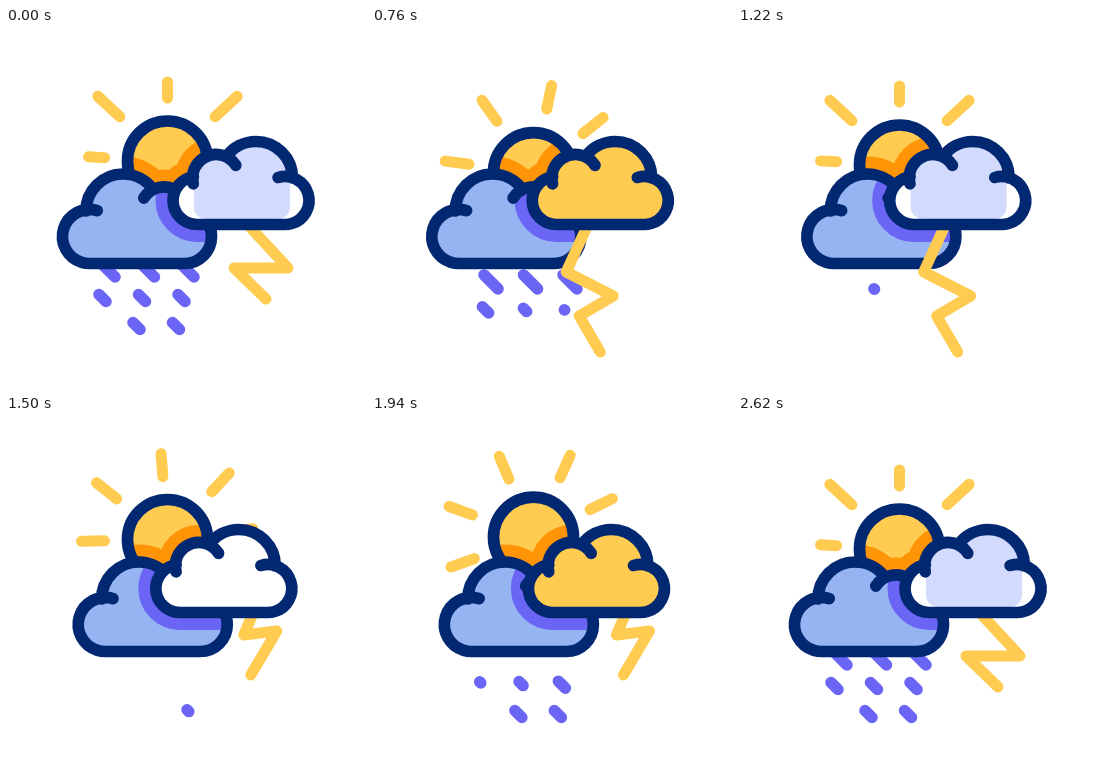
Write an HTML page with a canvas that moves like this. It is 360 px wide and 360 px high and loops after 3 s.

```html
<!DOCTYPE html>
<html lang="en">
<head>
<meta charset="utf-8">
<title>Weather</title>
<style>
html, body { margin: 0; width: 100%; height: 100%; overflow: hidden; background: #fff; }
canvas { display: block; width: 360px; height: 360px; }
</style>
</head>
<body>
<canvas id="stage" width="360" height="360"></canvas>
<script>
const ctx = document.getElementById('stage').getContext('2d');
const LOOP = 3000, TAU = 2 * Math.PI;
const NAVY = '#032872', BLUE = '#96b3f2', PURPLE = '#6a65f4';
const GOLD = '#ffcb51', ORANGE = '#ff9407', LAVENDER = '#d2dbfd';
const OUTLINE = 11.7, SHADOW = 17.5;

const clamp = v => Math.max(0, Math.min(1, v));
const mix = (a, b, u) => a + (b - a) * u;
const ease = (a, b, t) => (1 - Math.cos(Math.PI * clamp((t - a) / (b - a)))) / 2;
const hump = (a, b, t) => Math.sin(Math.PI * clamp((t - a) / (b - a)));

const rainCloudX = t => 16 * (ease(400, 1600, t) - ease(1900, 2580, t));
const stormCloudX = t => -17.2 * (ease(200, 1500, t) - ease(1600, 2400, t));
const sunY = t => 13 * ease(220, 900, t) - 27 * ease(900, 1720, t) + 14 * ease(1720, 2600, t);
const sunTurn = t => -36 * hump(220, 1220, t) ** 2 - 23 * hump(1320, 2600, t) ** 2;
const raySwell = t => hump(220, 1220, t) + hump(1240, 2300, t);

// Lobes are [x, y, radius]; the big one is on the left.
function makeCloud(foot, big, small, foot2) {
  const body = new Path2D(), outline = new Path2D();
  for (const [x, y, r] of [foot, big, small, foot2]) {
    body.moveTo(x + r, y);
    body.arc(x, y, r, 0, TAU);
  }
  body.rect(foot[0], big[1], foot2[0] - foot[0], foot[1] + foot[2] - big[1]);
  const arc = ([x, y, r], from, to, back, join) => {
    if (!join) outline.moveTo(x + r * Math.cos(from), y + r * Math.sin(from));
    outline.arc(x, y, r, from, to, back);
  };
  arc(foot, -1.28, Math.PI / 2, true);
  arc(foot2, Math.PI / 2, -1.42, true, true);
  arc(big, Math.PI, TAU - .62);
  arc(small, -2.57, .25);
  return { body, outline };
}

const rainCloud = makeCloud([83.5, 208.5, 27], [117, 183, 37], [158, 183, 24], [178.5, 208.5, 27]);
// Mirrored when drawn.
const stormCloud = makeCloud([-279, 172.5, 24], [-250, 150, 36.5], [-210, 150, 23.5], [-191, 172.5, 24]);

const REST_BOLT = [[243, 198], [282, 240], [228, 240], [260, 271]];
const LONG_BOLT = [[222, 198], [201, 244], [248, 268], [214, 288], [235, 324]];
const SHORT_BOLT = [[264, 198], [255, 219], [288, 215], [262, 259]];

function line(points, color, width) {
  ctx.beginPath();
  points.forEach(([x, y]) => ctx.lineTo(x, y));
  ctx.strokeStyle = color;
  ctx.lineWidth = width;
  ctx.stroke();
}

function drawOutline(path) {
  ctx.strokeStyle = NAVY;
  ctx.lineWidth = OUTLINE;
  ctx.stroke(path);
}

// The shadow is the cloud's body, grown on all sides.
function drawShadow(cloud, x, mirror, color) {
  ctx.save();
  ctx.translate(x, 0);
  ctx.scale(mirror, 1);
  ctx.fillStyle = ctx.strokeStyle = color;
  ctx.lineWidth = 2 * SHADOW;
  ctx.fill(cloud.body);
  ctx.stroke(cloud.body);
  ctx.restore();
}

function drawRays(t, x, y) {
  const swell = raySwell(t);
  for (let i = 3; i <= 8; i++) {
    const odd = i % 2, base = i * TAU / 8;
    const lean = (odd ? 3 : -3) * Math.cos(base);
    const angle = base + (lean + sunTurn(t)) * TAU / 360;
    const inner = odd ? 65 : 63, outer = mix(odd ? 95 : 79, 89, swell);
    const point = r => [x + r * Math.cos(angle), y + r * Math.sin(angle)];
    line([point(inner), point(outer)], GOLD, 11);
  }
}

function drawSun(t, rainX, stormX) {
  const x = 161.5, y = 133 + sunY(t);
  drawRays(t, x, y);
  const disc = new Path2D();
  disc.arc(x, y, 40, 0, TAU);
  ctx.fillStyle = GOLD;
  ctx.fill(disc);
  ctx.save();
  ctx.clip(disc);
  drawShadow(rainCloud, rainX, 1, ORANGE);
  drawShadow(stormCloud, stormX, -1, ORANGE);
  ctx.restore();
  drawOutline(disc);
}

// Drops vanish and return from the bottom row up, each row from right to left.
function drawRain(t, rainX) {
  for (let row = 0; row < 3; row++) {
    for (let col = row === 2 ? 1 : 0; col < 3; col++) {
      const end = 1060 - 290 * row + 85 * (2 - col), start = end + 970;
      if (t >= end && t < start) continue;
      const falling = t < end;
      const half = (row ? 3.5 : 7) * clamp((falling ? end - t : t - start) / 200);
      const shift = falling ? 19 * ease(220, 1150, t) : -4 * (1 - clamp((t - start) / 300));
      const x = 102 - 5.5 * row + 39.5 * col + rainX + 1.15 * shift;
      const y = 242 + 28 * row + shift;
      line([[x - half, y - half], [x + half + .01, y + half]], PURPLE, 11.5);
    }
  }
}

function drawRainCloud(rainX, stormX) {
  ctx.save();
  ctx.translate(rainX, 0);
  ctx.fillStyle = BLUE;
  ctx.fill(rainCloud.body);
  ctx.save();
  ctx.clip(rainCloud.body);
  drawShadow(stormCloud, stormX - rainX, -1, PURPLE);
  ctx.restore();
  drawOutline(rainCloud.outline);
  ctx.restore();
}

function drawStormCloud(t, stormX) {
  const flash = (t >= 680 && t < 880) || (t >= 1860 && t < 2040);
  const shaded = t < 680 || (t >= 880 && t < 1400) || t >= 2160;
  const bolt = t < 660 || t >= 2160 ? REST_BOLT : t < 1380 ? LONG_BOLT : SHORT_BOLT;
  ctx.save();
  ctx.translate(stormX, 0);
  line(bolt, GOLD, 11);
  ctx.scale(-1, 1);
  ctx.fillStyle = flash ? GOLD : '#fff';
  ctx.fill(stormCloud.body);
  if (shaded) {
    ctx.save();
    ctx.clip(stormCloud.body);
    ctx.beginPath();
    ctx.roundRect(-284, 100, 96, 91, 12);
    ctx.fillStyle = LAVENDER;
    ctx.fill();
    ctx.restore();
  }
  drawOutline(stormCloud.outline);
  ctx.restore();
}

function draw() {
  const t = performance.now() % LOOP;
  const rainX = rainCloudX(t), stormX = stormCloudX(t);
  ctx.fillStyle = '#fff';
  ctx.fillRect(0, 0, 360, 360);
  ctx.lineCap = ctx.lineJoin = 'round';
  drawSun(t, rainX, stormX);
  drawRain(t, rainX);
  drawRainCloud(rainX, stormX);
  drawStormCloud(t, stormX);
  requestAnimationFrame(draw);
}
draw();
</script>
</body>
</html>
```
